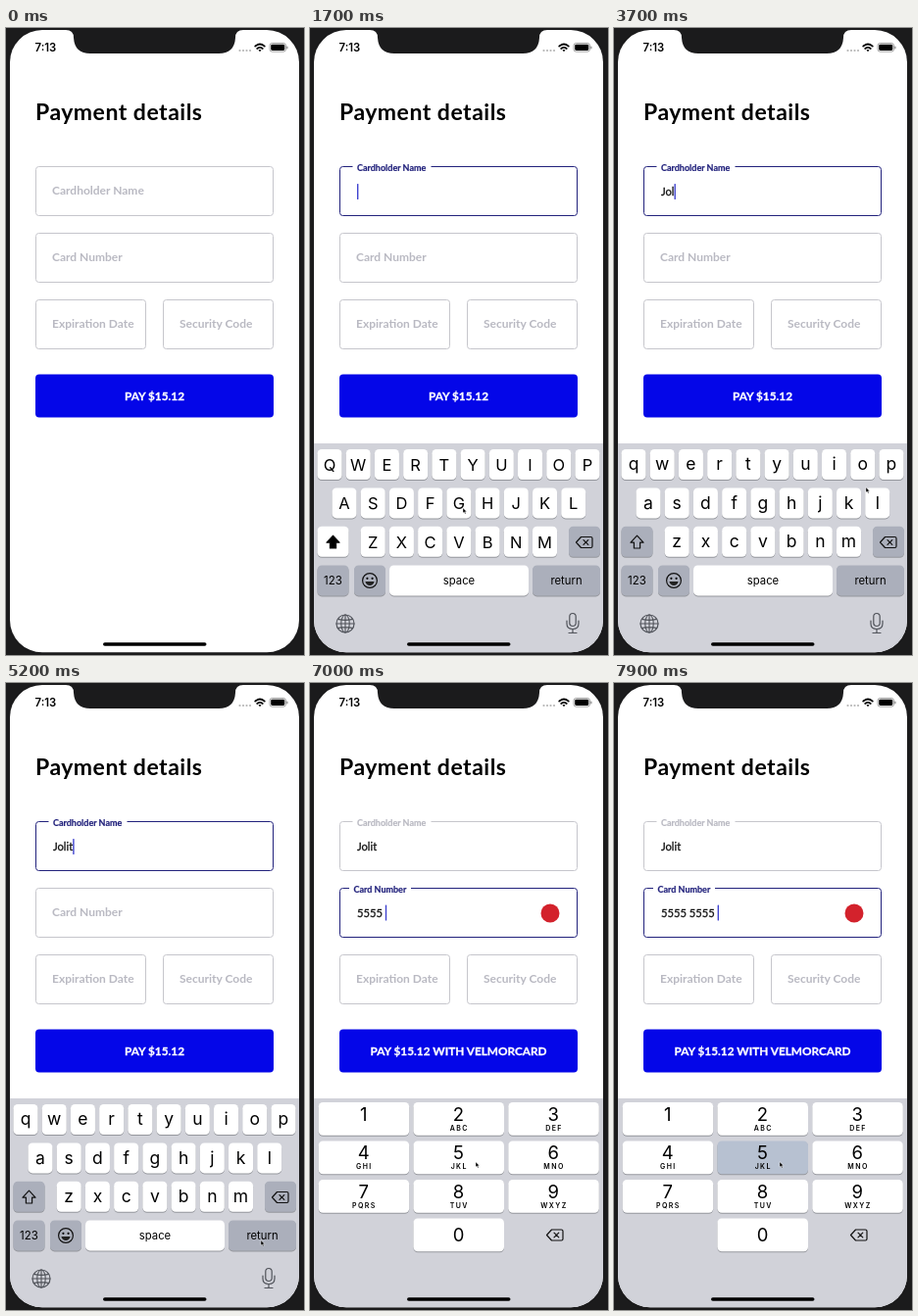
An HTML page for the animation above (8 s loop, 304 by 640 pixels).

```html
<!DOCTYPE html>
<html lang="en">
<head>
<meta charset="utf-8">
<title>Payment details</title>
<style>
html, body { margin: 0; width: 100%; height: 100%; overflow: hidden; background: #1b1b1c; }
svg { display: block; width: 304px; height: 640px; }
text { white-space: pre; }
.form { font-family: Lato, "Open Sans", sans-serif; }
.sys { font-family: Inter, Roboto, sans-serif; }
</style>
</head>
<body>
<svg id="stage" viewBox="0 0 304 640"></svg>
<script>
const LOOP = 8000;
const NAME = 'Jolit', BRAND = 'VELMORCARD';
const FOCUS_NAME = 560, KEYS_IN = 620, FOCUS_CARD = 5600;
const NAME_TIMES = [2150, 2850, 3600, 4200, 4750];
const CARD_TIMES = Array.from({ length: 9 }, (_, i) => 6290 + 205 * i);
const HOLD = 90;
const INPUT_SIZE = 11.2;

// pointer path: time, x, y
const PATH = [
  [100, 150, 94], [450, 103, 182], [1150, 103, 182], [1680, 156, 490], [1760, 156, 490],
  [2000, 211, 488], [2250, 211, 488], [2700, 254, 448], [2900, 254, 448], [3350, 257, 469],
  [3750, 257, 469], [4050, 225, 448], [4250, 225, 448], [4620, 137, 448], [4800, 137, 448],
  [5150, 260, 569], [5650, 260, 569], [6150, 169, 489], [8000, 169, 489]
];

const INK = '#22227c', GREY = '#b9b9c2', LINE = '#c6c6cc', KEY = '#fff', DARK = '#abafbb';
const stage = document.getElementById('stage');
const ruler = document.createElement('canvas').getContext('2d');

const clamp = v => Math.max(0, Math.min(1, v));
const ease = v => (v = clamp(v)) * v * (3 - 2 * v);
const mix = (a, b, k) => a + (b - a) * k;
const countDone = (times, t) => times.filter(x => x <= t).length;
const heldIndex = (times, t) => times.findIndex(x => t >= x - HOLD && t < x);

const rect = (x, y, w, h, r, fill, more = '') =>
  `<rect x="${x}" y="${y}" width="${w}" height="${h}" rx="${r}" fill="${fill}" ${more}/>`;
const path = (d, fill = 'none', stroke = 'none', w = 1.2) =>
  `<path d="${d}" fill="${fill}" stroke="${stroke}" stroke-width="${w}" stroke-linejoin="round" stroke-linecap="round"/>`;
const at = (x, y, body) => `<g transform="translate(${x} ${y})">${body}</g>`;
// y is the middle of the capitals, thick adds a little weight
const text = (s, x, y, size, fill, { font = 'form', weight = 400, anchor = 'start', gap = 0, thick = 0 } = {}) =>
  `<text class="${font}" x="${x}" y="${y + size * .36}" font-size="${size}" font-weight="${weight}" ` +
  `text-anchor="${anchor}" letter-spacing="${gap}" fill="${fill}" stroke="${fill}" stroke-width="${thick}">${s}</text>`;
const sysText = (s, x, y, size, weight = 400, gap = 0) =>
  text(s, x, y, size, '#000', { font: 'sys', weight, anchor: 'middle', gap });

function pointer(t) {
  if (t < PATH[0][0]) return '';
  const i = PATH.findIndex(p => p[0] > t);
  const a = PATH[i - 1], b = PATH[i], k = ease((t - a[0]) / (b[0] - a[0]));
  return at(mix(a[1], b[1], k), mix(a[2], b[2], k),
    path('M0 0V5L1.2 4L2.2 6L3.1 5.6L2.2 3.7H3.8Z', '#000', '#fff', .4));
}

function field(x, y, w, label, { up = 0, active = false, labelX = 48, labelW = 0 } = {}) {
  const line = active ? INK : LINE;
  let out = rect(x + .5, y + .5, w - 1, 50, 3, '#fff', `stroke="${line}"`);
  if (up) {
    const gap = (labelW + 9) * up;
    out += rect(labelX + labelW / 2 - gap / 2, y - 1, gap, 4, 0, '#fff');
  }
  return out + text(label, mix(x + 17, labelX, up), mix(y + 25, y + 1.5, up), mix(12, 9, up),
    active ? INK : GREY, { weight: 700, thick: .2 * up });
}

function input(value, y, caretOn) {
  ruler.font = `${INPUT_SIZE}px Lato, "Open Sans", sans-serif`;
  const end = 48 + ruler.measureText(value).width;
  return text(value, 48, y, INPUT_SIZE, '#111', { thick: .3 }) +
    (caretOn ? rect(end, y - 8, 1.4, 16, .6, '#3f43cf') : '');
}

const blink = since => since % 1000 < 560;

function form(t) {
  const typed = countDone(NAME_TIMES, t), digits = countDone(CARD_TIMES, t);
  const onCard = t >= FOCUS_CARD, onName = t >= FOCUS_NAME && !onCard;
  const number = '5'.repeat(digits).replace(/(.{4})/g, '$1 ');
  const known = digits >= 2;
  const lastName = typed ? NAME_TIMES[typed - 1] : FOCUS_NAME;
  const lastDigit = digits ? CARD_TIMES[digits - 1] : FOCUS_CARD;
  return text('Payment details', 30, 86, 23, '#000', { weight: 700, gap: .5 }) +
    field(30, 141, 243, 'Cardholder Name',
      { up: ease((t - FOCUS_NAME) / 160), active: onName, labelW: 71 }) +
    field(30, 209, 243, 'Card Number',
      { up: ease((t - FOCUS_CARD) / 160), active: onCard, labelX: 44.5, labelW: 54 }) +
    field(30, 277, 113, 'Expiration Date') +
    field(160, 277, 113, 'Security Code') +
    input(NAME.slice(0, typed), 167, onName && blink(t - lastName)) +
    input(number, 234.5, onCard && blink(t - lastDigit)) +
    (known ? '<circle cx="245" cy="235" r="9.5" fill="#d3222c"/>' : '') +
    rect(30, 353.5, 243, 44, 4, '#0406e8') +
    text('PAY $15.12' + (known ? ' WITH ' + BRAND : ''), 151.5, 375.5, 11.8, '#fff',
      { weight: 700, anchor: 'middle', thick: .3 });
}

const key = (x, y, w, h = 31, fill = KEY) =>
  rect(x, y + 1, w, h, 4.5, '#95979d') + rect(x, y, w, h, 4.5, fill);

const erase = (x, y) => at(x, y,
  path('M-8.5 0L-3.5 -5.5H6.5Q8 -5.5 8 -4V4Q8 5.5 6.5 5.5H-3.5ZM-1 -2.4L3.8 2.4M3.8 -2.4L-1 2.4', 'none', '#111', 1.2));

function bubble(letter, c, y) {
  return path(`M${c - 16} ${y - 44}h32q5 0 5 5v25q0 5 -4 8t-4 8v24q0 5 -5 5h-16q-5 0 -5 -5v-24q0 -5 -4 -8t-4 -8v-25q0 -5 5 -5z`,
    '#fff', '#b6b8bf', .6) + sysText(letter, c, y - 24, 28);
}

function letters(t) {
  const upper = t < NAME_TIMES[0];
  const held = NAME[heldIndex(NAME_TIMES, t)];
  let out = '', top = '';
  ['qwertyuiop', 'asdfghjkl', 'zxcvbnm'].forEach((row, r) => {
    const y = 430 + 39.4 * r;
    [...row].forEach((ch, i) => {
      const c = [20, 35, 64.2][r] + 29.22 * i;
      const glyph = upper ? ch.toUpperCase() : ch;
      out += key(c - 12.5, y, 25) + sysText(glyph, c, y + (upper ? 16 : 15), upper ? 16.5 : 17.5);
      if (glyph === held) top = bubble(glyph, c, y);
    });
  });
  const returnDown = t >= 5480 && t < FOCUS_CARD;
  out += key(7.5, 508.8, 32, 31, upper ? KEY : DARK) +
    path('M23.5 518.2L30 525.2H26.6V531H20.4V525.2H17Z', upper ? '#000' : 'none', '#111') +
    key(264, 508.8, 32, 31, DARK) + erase(280, 525) +
    key(7.5, 548.4, 32, 31, DARK) + sysText('123', 23.5, 564, 11.5) +
    key(45, 548.4, 32, 31, DARK) +
    at(61, 564, '<circle r="7.4" fill="none" stroke="#111" stroke-width="1.2"/>' +
      '<circle cx="-2.6" cy="-2.2" r="1.1"/><circle cx="2.6" cy="-2.2" r="1.1"/>' +
      path('M-4.6 1H4.6Q3.6 5 0 5T-4.6 1Z', '#222')) +
    key(81, 548.4, 142, 31) + sysText('space', 152, 563.5, 11.3) +
    key(227, 548.4, 69, 31, returnDown ? KEY : DARK) + sysText('return', 261.5, 563.5, 11.3) +
    at(36, 608, '<circle r="9" fill="none" stroke="#50535a" stroke-width="1.2"/>' +
      '<ellipse rx="4.2" ry="9" fill="none" stroke="#50535a" stroke-width="1.1"/>' +
      path('M0 -9V9M-9 0H9M-7.6 -4.6Q0 -2.6 7.6 -4.6M-7.6 4.6Q0 2.6 7.6 4.6', 'none', '#50535a', 1.1)) +
    at(268, 607, rect(-3.2, -9.5, 6.4, 13, 3.2, 'none', 'stroke="#50535a" stroke-width="1.2"') +
      path('M-6 -2V1Q-6 6.5 0 6.5T6 1V-2M0 6.5V10.5M-4 10.5H4', 'none', '#50535a'));
  return out + top;
}

function numbers(t) {
  const down = heldIndex(CARD_TIMES, t) >= 0;
  const subs = ['', 'ABC', 'DEF', 'GHI', 'JKL', 'MNO', 'PQRS', 'TUV', 'WXYZ'];
  let out = '';
  subs.forEach((sub, i) => {
    const x = 8.7 + 96.8 * (i % 3), y = 428 + 39.5 * Math.floor(i / 3);
    out += key(x, y, 92.5, 33.8, down && i === 4 ? '#b7c1d1' : KEY) +
      sysText(i + 1, x + 46, y + 12.3, 18.5) + sysText(sub, x + 46.7, y + 26.3, 7, 600, 1.4);
  });
  return out + key(105.5, 546.5, 92.5, 33.8) + sysText('0', 151.5, 563.5, 18.5) + erase(250, 563.5);
}

function keyboard(t) {
  if (t < KEYS_IN) return '';
  const s = 14 * (t - KEYS_IN) / 1000;
  const drop = 216 * (1 + s) * Math.exp(-s);
  return at(0, drop < .05 ? 0 : drop,
    rect(0, 424, 304, 216, 0, '#d1d2d9') + (t < FOCUS_CARD + 50 ? letters(t) : numbers(t)));
}

const CLIP = '<clipPath id="screen"><rect x="4" y="2" width="295" height="635.3" rx="33"/></clipPath>';
const FRAME = path('M61 0V2Q69 2 69 10Q70 26 86 26H217Q233 26 234 10Q234 2 242 2V0Z', '#1b1b1c') +
  text('7:13', 29.5, 20, 11.3, '#000', { font: 'sys', weight: 600 }) +
  [238.5, 242, 245.5, 249].map(x => `<circle cx="${x}" cy="23" r="1.1" fill="#b5b5b5"/>`).join('') +
  path('M254.2 18.6Q259 14.4 263.8 18.6M256.2 21Q259 18.6 261.8 21', 'none', '#000', 1.7) +
  path('M257.5 22.6Q259 21.4 260.5 22.6L259 24.2Z', '#000') +
  rect(269, 15.5, 16.5, 8.6, 2.4, 'none', 'stroke="#888" stroke-width=".8"') +
  rect(270.2, 16.7, 14.1, 6.2, 1.4, '#000') + rect(286.3, 18.4, 1.2, 3, .6, '#888') +
  rect(99, 627.2, 105.5, 3.6, 1.8, '#000');

function draw(now) {
  const t = now % LOOP;
  stage.innerHTML = CLIP + '<g clip-path="url(#screen)">' + rect(0, 0, 304, 640, 0, '#fff') +
    form(t) + keyboard(t) + '</g>' + FRAME + pointer(t);
  requestAnimationFrame(() => draw(performance.now() - start));
}

const start = performance.now();
draw(0);
</script>
</body>
</html>
```
